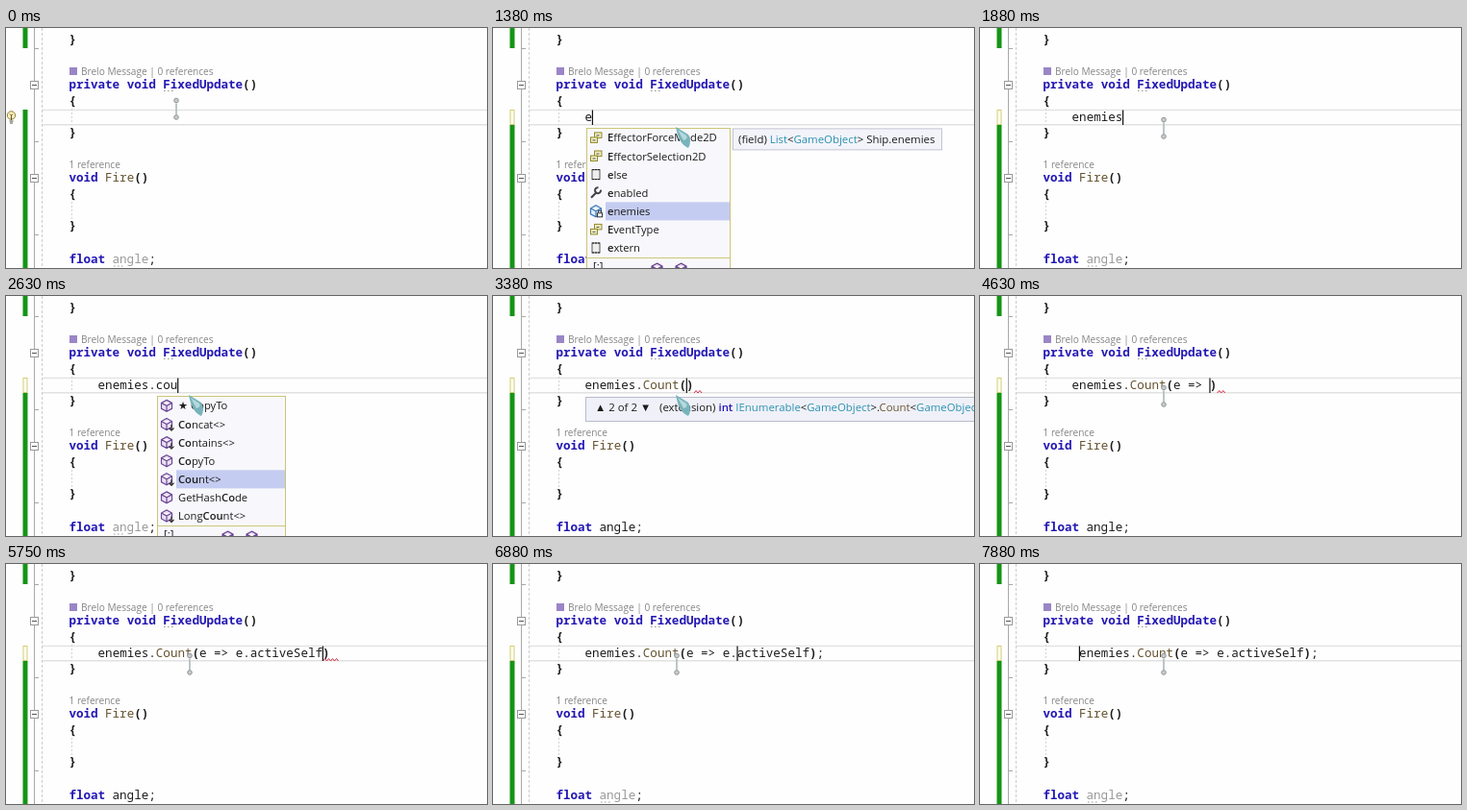
An HTML page for the animation above (8 s loop, 500 by 250 pixels).

```html
<!DOCTYPE html>
<html lang="en">
<head>
<meta charset="utf-8">
<title>Code editor typing</title>
<style>
html, body { margin: 0; width: 100%; height: 100%; overflow: hidden; background: #fefefe; }
svg { display: block; width: 100%; height: 100%; }
text { white-space: pre; fill: #1c1c1c; }
.code { font: 500 12.55px "Noto Sans Mono", monospace; }
.lens { font: 10.1px "Open Sans", sans-serif; fill: #858585; }
.ui { font: 500 11.2px "Open Sans", sans-serif; }
.tip { font: 500 11.4px "Open Sans", sans-serif; }
.key { fill: #2418b4; font-weight: 600; }
.code .mark { font-weight: 600; }
.method { fill: #665230; }
.type { fill: #2b91af; }
.match { font-weight: 600; }
</style>
</head>
<body>
<svg viewBox="0 0 500 250">
  <g id="page"></g>
  <g id="beam" fill="#c9cccd" stroke="#8f9597">
    <path d="M0 3V15" stroke="#bcc5c7" stroke-width="2"/>
    <circle r="2.3"/><circle cy="17.5" r="2.3"/>
  </g>
  <g id="arrow">
    <path d="M190 103L203 111Q207 118 203 125Q193 121 190 103Z" fill="#78b3bb"/>
    <path d="M192 106L201 112Q203 116 198 117Z" fill="#b4d9dd"/>
  </g>
</svg>
<script>
const LOOP = 8000, CHAR = 7.53, LEFT = 95.6, ROW = 19.1;
const $ = id => document.getElementById(id);

const rect = (x, y, w, h, fill, stroke = 'none') =>
  `<rect x="${x}" y="${y}" width="${w}" height="${h}" fill="${fill}" stroke="${stroke}"/>`;
const path = (d, stroke, extra = '') => `<path d="${d}" stroke="${stroke}" fill="none" ${extra}/>`;
const text = (cls, x, y, s) => `<text class="${cls}" x="${x}" y="${y}">${s}</text>`;
const escape = s => s.replace(/</g, '&lt;');

const TOKENS = [
  ['key', /^(private|void|float|int|bool|FixedUpdate)$/],
  ['method', /^(Fire|Count)$/],
  ['type', /^(IEnumerable|GameObject|List)$/],
  ['mark', /^[(){}]$/]
];
const paint = s => escape(s).replace(/\w+|[(){}]/g, word => {
  const hit = TOKENS.find(([, test]) => test.test(word));
  return hit ? `<tspan class="${hit[0]}">${word}</tspan>` : word;
});
const code = (x, y, s) => text('code', x, y, paint(s));

// Completion lists: each item is an icon letter, then its label.
const E_ITEMS = ['nEffectorForceMode2D', 'nEffectorSelection2D', 'kelse', 'penabled', 'fenemies', 'nEventType', 'kextern'];
const LISTS = {
  field: { x: 97, y: 104.4, w: 150, sel: 4, tip: '(field) List<GameObject> Ship.enemies', items: E_ITEMS },
  members: { x: 157, y: 104.4, w: 134, sel: 0,
    items: ['m★ Add', 'p★ Count', 'm★ Remove', 'mAdd', 'mAddRange', 'xAggregate<>', 'xAll<>'] },
  count: { x: 157, y: 104.4, w: 134, sel: 4,
    items: ['m★ CopyTo', 'xConcat<>', 'xContains<>', 'mCopyTo', 'xCount<>', 'mGetHashCode', 'xLongCount<>'] },
  lambda: { x: 202, y: 151.8, w: 310, sel: 4, soft: true, items: E_ITEMS },
  active: { x: 254, y: 104.4, w: 145, sel: 1, tip: 'bool GameObject.activeSelf { get; }',
    items: ['pactiveInHierarchy', 'pactiveSelf', 'mAddComponent', 'mAddComponent<>', 'mBroadcastMessage', 'mCompareTag', 'mEquals'] }
};

function icon(kind, x, y) {
  const cube = (line, fill) =>
    `<path d="M6.5 .5L12 3.5V9.5L6.5 12.5L1 9.5V3.5ZM1 3.5L6.5 6.5L12 3.5M6.5 6.5V12.5" fill="${fill}" stroke="${line}" stroke-width="1.2"/>`;
  const shapes = {
    m: cube('#6c4694', '#e9e0f2'),
    x: cube('#6c4694', '#e9e0f2') + path('M11.5 7V13M9 10.5L11.5 13L14 10.5', '#333', 'stroke-width="1.3"'),
    f: cube('#3a78b8', '#dcebf8') + rect(8, 8.5, 5, 4, '#fff', '#333') + path('M9 8V6H12V8', '#333'),
    n: rect(5, 1, 7.5, 5.5, '#f0ecc0', '#8f8a2c') + rect(1, 6, 7, 5.5, '#f0ecc0', '#8f8a2c') + path('M3 9H6M7 4H10', '#555'),
    k: rect(2.5, 1.5, 8, 10, '#eee', '#555') + path('M2.5 1.5H10.5M2.5 11.5H10.5', '#222', 'stroke-dasharray="2 1"'),
    p: path('M1.5 11.5L7 6', '#444', 'stroke-width="2.2"') + path('M11.5 3.5A3 3 0 1 1 9 1', '#444', 'stroke-width="2"')
  };
  return `<g transform="translate(${x} ${y})">${shapes[kind]}</g>`;
}

function highlight(label, typed) {
  for (let n = typed.length; n; n--) {
    const i = label.toLowerCase().indexOf(typed.slice(0, n).toLowerCase());
    if (i >= 0) return escape(label.slice(0, i)) +
      `<tspan class="match">${label.slice(i, i + n)}</tspan>` + escape(label.slice(i + n));
  }
  return escape(label);
}

function list({ x, y, w, sel, items, soft, tip }, typed) {
  const edge = '#cbc577', bottom = y + ROW * 7 + 1.5;
  let s = rect(x + .5, y + .1, w - 1, 165, '#f8f8fc', edge);
  items.forEach((item, i) => {
    const top = y + .5 + ROW * i;
    if (i === sel) s += soft ? rect(x + 20.5, top, w - 21, ROW, '#eef0f8', '#d3d6e4')
      : rect(x + 20, top, w - 21, ROW, '#c5ccf1');
    s += icon(item[0], x + 3.5, top + 3);
    s += text('ui', x + 22, top + 13.5, highlight(item.slice(1), typed));
  });
  s += path(`M${x} ${bottom}H${x + w}`, edge) + text('ui', x + 7, bottom + 12, '[:]');
  for (const dx of [67, 92]) s += icon('m', x + dx, bottom + 5);
  if (soft) {
    s += rect(x + .5, y - 20.3, w, 20, '#fcfcfd', edge) + path(`M${x} ${y}H500`, '#c6b951', 'stroke-width="1.5"');
    s += text('ui', x + 22, y - 6, escape('<lambda expression>'));
  }
  if (tip) s += rect(x + w + 2.5, y + .5, 217, 22, '#f3f4fa', '#c2c4d2') + text('tip', x + w + 8, y + 15.5, paint(tip));
  return s;
}

const signature = () => rect(96.5, 105.5, 420, 25, '#f0f1f8', '#b9bbcb') +
  text('tip', 106, 120, '▲ 2 of 2 ▼') +
  text('tip', 173, 120, paint('(extension) int IEnumerable<GameObject>.Count<GameObject>'));

function squiggle(col, chars) {
  let d = `M${LEFT + col * CHAR + .5} 101`;
  for (let i = 1; i * 2 <= chars * CHAR; i++) d += `l2 ${i % 2 ? -2.5 : 2.5}`;
  return path(d, '#d4304c');
}

// [time, line text, caret column or -1, popup, word typed so far]
const STEPS = [
  [0, '', -1], [1000, '', 0],
  [1250, 'e', 1], [1380, 'e', 1, 'field', 'e'], [1500, 'en', 2, 'field', 'en'],
  [1630, 'ene', 3, 'field', 'ene'], [1750, 'enem', 4, 'field', 'enem'], [1880, 'enemies', 7],
  [2000, 'enemies.', 8], [2130, 'enemies.', 8, 'members', ''], [2250, 'enemies.c', 9, 'count', 'c'],
  [2380, 'enemies.co', 10, 'count', 'co'], [2500, 'enemies.cou', 11, 'count', 'cou'],
  [2750, 'enemies.Count', 13],
  [3130, 'enemies.Count()', 14], [3250, 'enemies.Count()', 14, 'sig'],
  [3630, 'enemies.Count(e)', 15, 'sig'], [3750, 'enemies.Count(e)', 15, 'lambda', 'e'],
  [4000, 'enemies.Count(e )', 16, 'sig'], [4130, 'enemies.Count(e =)', 17, 'sig'],
  [4250, 'enemies.Count(e =>)', 18, 'sig'], [4380, 'enemies.Count(e => )', 19, 'sig'],
  [4500, 'enemies.Count(e => )', 19], [4880, 'enemies.Count(e => e)', 20],
  [5130, 'enemies.Count(e => e.)', 21], [5250, 'enemies.Count(e => e.)', 21, 'active', ''],
  [5380, 'enemies.Count(e => e.a)', 22, 'active', 'a'], [5500, 'enemies.Count(e => e.ac)', 23, 'active', 'ac'],
  [5630, 'enemies.Count(e => e.act)', 24, 'active', 'act'],
  [5750, 'enemies.Count(e => e.activeSelf)', 31], [6130, 'enemies.Count(e => e.activeSelf)', 32],
  ...[[6500, 33], [6750, 31], [6880, 21], [7000, 14], [7130, 8], [7250, 0]]
    .map(([at, col]) => [at, 'enemies.Count(e => e.activeSelf);', col]),
  [7630, ' enemies.Count(e => e.activeSelf);', 1]
];

function gutter(edited) {
  const green = '#159415', grey = '#a9a9a9';
  let s = rect(17.5, 0, 5, 21, green) + rect(17.5, edited ? 101 : 85, 5, 165, green);
  if (edited) s += rect(18, 85.5, 4, 15, '#fffff4', '#d2cd72');
  else s += '<circle cx="5.5" cy="91" r="4.2" fill="#fff3b8" stroke="#8d7a3c"/>' +
    path('M3.5 97H7.5M4 99H7M5.5 96V91L4 89.5M5.5 91L7 89.5', '#5c5335');
  s += path('M29.5 0V250M29.5 21.5H34M29.5 118.5H34M29.5 215.5H34', grey);
  for (const y of [55, 152])
    s += rect(25.5, y + .5, 8, 8, '#fff', '#999') + path(`M27 ${y + 4.5}H32`, '#555');
  return s + path('M37.5 0V250', '#cccccc', 'stroke-dasharray="3 2"') +
    path('M68.5 84V101M68.5 181V199', '#d2d2d2', 'stroke-dasharray="2 2"');
}

function page([at, line, col, popup, typed]) {
  const broken = at >= 3250 && at < 6750;
  let s = path('M37 85.5H500M37 100.8H500', '#e2e2e2', 'stroke-width="1.5"') + gutter(at >= 1250);
  s += rect(66, 41, 8, 8, '#9a86c6') + text('lens', 78, 48.5, 'Brelo Message | 0 references') +
    text('lens', 65.5, 145.5, '1 reference');
  const lines = [[16, '}'], [63, 'private void FixedUpdate()'], [80, '{'], [113, '}'],
    [160, 'void Fire()'], [177, '{'], [210, '}']];
  for (const [y, str] of lines) s += code(65.4, y, str);
  s += text('code', 65.4, 245,
    `${paint('float')} <tspan fill="${broken ? '#1c1c1c' : '#999'}">angle</tspan>;`);
  const dots = (x, y) => path(`M${x} ${y}h10`, '#999', 'stroke-dasharray="1.5 2.5"');
  s += dots(164, 65.5);
  if (!broken) s += dots(112, 248);
  s += code(LEFT, 97, line);
  if (line.endsWith(')'))
    s += at >= 5750 ? squiggle(line.length - 1, 2.2) : squiggle(line.length, 1.3);
  if (col >= 0) s += rect(LEFT + col * CHAR - .3, 85.5, 1.2, 15.5, '#111');
  if (popup === 'sig' || popup === 'lambda') s += signature();
  if (LISTS[popup]) s += list(LISTS[popup], typed);
  return s;
}

const start = performance.now();
let shown;
function frame() {
  const t = (performance.now() - start) % LOOP;
  const step = STEPS.findLast(([at]) => at <= t);
  if (step !== shown) {
    $('page').innerHTML = page(step);
    shown = step;
  }
  const k = Math.min(4, Math.floor(t / 126)) / 4;
  const [x, y] = t < 750 ? [177 - 9 * k, 75.5 + 8 * k] : [191, 95.5];
  const over = step[3] && step[3] !== 'active';
  $('beam').setAttribute('transform', `translate(${x} ${y})`);
  $('beam').style.display = over ? 'none' : '';
  $('arrow').style.display = over ? '' : 'none';
  requestAnimationFrame(frame);
}
frame();
</script>
</body>
</html>
```
